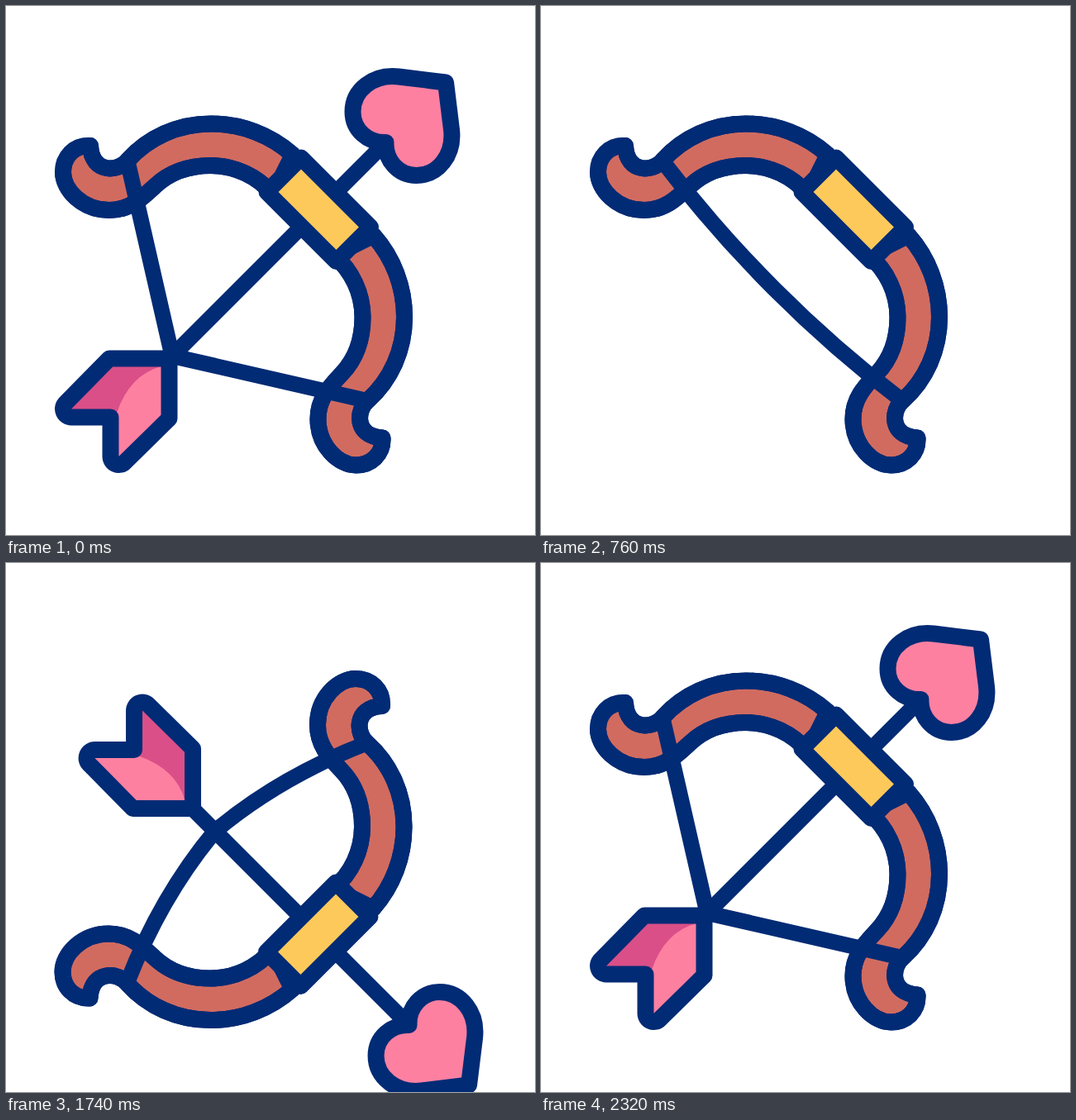
An HTML page for the animation above (2400 ms loop, 640 px wide and 640 px high).

```html
<!DOCTYPE html>
<html lang="en">
<head>
<meta charset="utf-8">
<title>Bow and arrow</title>
<style>
  html, body { margin: 0; width: 100%; height: 100%; overflow: hidden; background: #fff; }
  svg { display: block; width: 100%; height: 100%; }
  .line { fill: none; stroke: #022b75; stroke-width: 20; stroke-linecap: round; stroke-linejoin: round; }
  .thin { stroke-width: 19; }
</style>
</head>
<body>
<svg viewBox="0 0 640 640">
  <defs>
    <g id="limb">
      <path id="limbShape" fill="#d16b60" d="M347 180 A149 149 0 0 0 248 142.5 C208 142.5 172 159 147 187
        C137 200 104 204 102 169 C82 168 69 183 69 201 C69 222 92 247 125 247
        C150 247 165 232 180 218 C198 201 222 193 248 193 A98.5 98.5 0 0 1 323 228 Z"/>
      <path fill="#b05448" d="M320 157 L347 180 L323 226 L272 196 Z"/>
      <use href="#limbShape" class="line" style="fill:none"/>
      <path class="line" d="M347 180 A149 149 0 0 0 248 142.5 C208 142.5 172 159 147 187
        C137 200 104 204 102 169 C82 168 69 183 69 201 C69 222 92 247 125 247
        C150 247 165 232 180 218 C198 201 222 193 248 193 A98.5 98.5 0 0 1 323 228"/>
    </g>
  </defs>
  <g id="all">
    <g id="arrow">
      <path class="line thin" d="M197 427.5 L460 164.5"/>
      <path fill="#fd80a1" d="M125 426.5 H197.5 V499 L143.6 552 A10 10 0 0 1 126.5 545 V497.5 H79 A10 10 0 0 1 72 480.4 Z"/>
      <path fill="#da4f88" d="M125 426.5 H197.5 L188 436 Q150 446 134 492 L126.5 497.5 H79 A10 10 0 0 1 72 480.4 Z"/>
      <path class="line" d="M125 426.5 H197.5 V499 L143.6 552 A10 10 0 0 1 126.5 545 V497.5 H79 A10 10 0 0 1 72 480.4 Z"/>
      <path class="line" style="fill:#fd80a1" d="M532 92.5 L475 85.5 C444 82 419.5 102 419.5 128 C419.5 150 438 166 459.5 165
        C458.5 186.5 474.5 205 496.5 205 C522.5 205 542.5 180.5 539 149.5 Z"/>
    </g>
    <use href="#limb"/>
    <use href="#limb" transform="matrix(0 -1 -1 0 624.5 624.5)"/>
    <path class="line" style="fill:#fdc95b" d="M357 183.5 L315.5 225 L399.5 309 L441 267.5 Z"/>
    <path id="string" class="line thin"/>
  </g>
</svg>
<script>
  const LOOP = 2400;
  const all = document.getElementById('all');
  const arrow = document.getElementById('arrow');
  const string = document.getElementById('string');

  const clamp = u => Math.min(1, Math.max(0, u));
  const span = (t, a, b) => clamp((t - a) / (b - a));
  const ease = u => u * u * (3 - 2 * u);
  const move = (t, a, b, from, to) => from + (to - from) * ease(span(t, a, b));

  // Diagonal shift along the arrow's axis
  function arrowShift(t) {
    if (t < 373) return move(t, 120, 373, 0, -14);
    if (t < 1000) return move(t, 373, 790, -14, 580);
    if (t < 1850) return move(t, 1400, 1813, 514, -14);
    return move(t, 1895, 2305, -14, 0);
  }

  // 1 = fully drawn, 0 = straight, with a fading wobble after release
  function pull(t) {
    if (t < 570) return 1 - span(t, 435, 570) ** 2;
    const dt = t - 570;
    const wobble = -0.17 * Math.exp(-dt / 450) * Math.sin(dt / 240 * 2 * Math.PI);
    const drawn = ease(span(t, 1683, 1813));
    return wobble * (1 - drawn) + drawn;
  }

  function angle(t) {
    return t < 1600 ? move(t, 1100, 1401, 0, 90) : move(t, 1895, 2305, 90, 0);
  }

  function stringPath(p) {
    const x1 = 147, y1 = 187.5, x2 = 437, y2 = 477.5;
    const nx = 292 - 91 * p, ny = 332.5 + 91 * p;
    const bend = 4 * p * (1 - p) * 13;
    const ctrl = (x, y) => `${(x + nx) / 2 - bend} ${(y + ny) / 2 + bend}`;
    return `M${x1} ${y1} Q${ctrl(x1, y1)} ${nx} ${ny} Q${ctrl(x2, y2)} ${x2} ${y2}`;
  }

  function draw(t) {
    const s = arrowShift(t);
    all.setAttribute('transform', `rotate(${angle(t)} 276.5 347.5)`);
    arrow.setAttribute('transform', `translate(${s} ${-s})`);
    arrow.setAttribute('visibility', t > 790 && t < 1400 ? 'hidden' : 'visible');
    string.setAttribute('d', stringPath(pull(t)));
  }

  const start = performance.now();
  function tick() {
    draw((performance.now() - start) % LOOP);
    requestAnimationFrame(tick);
  }
  draw(0);
  requestAnimationFrame(tick);
</script>
</body>
</html>
```
